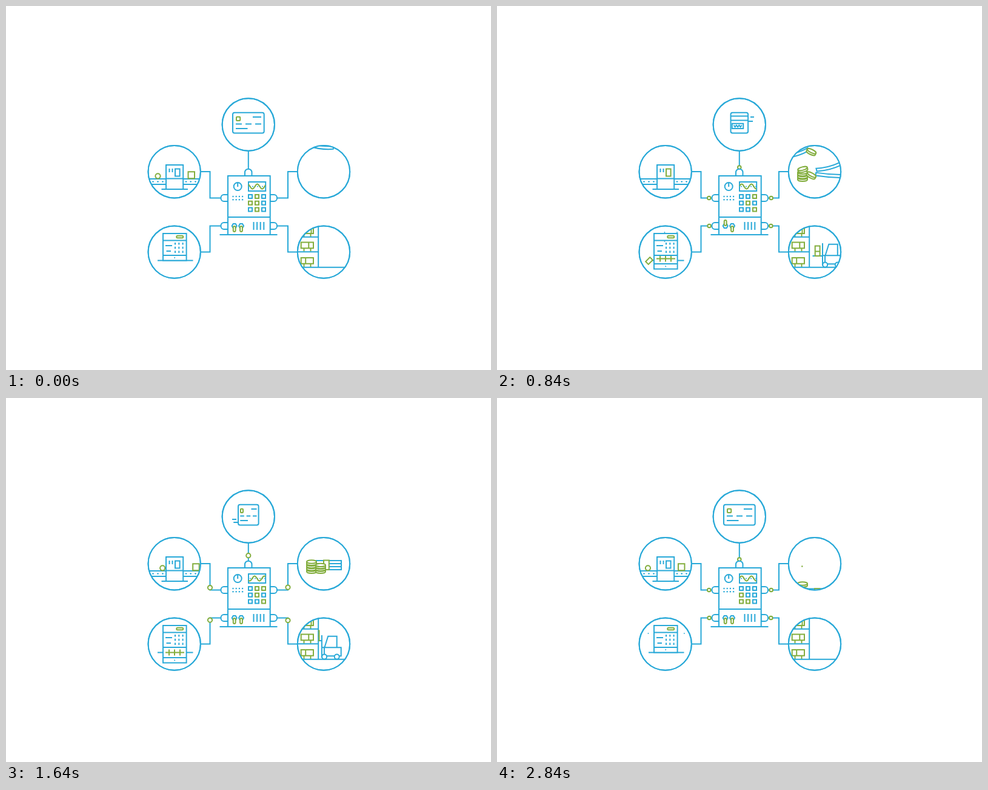
These frames come from a looping animation (800 by 600 pixels, 2880 ms). An HTML page with a canvas:

```html
<!DOCTYPE html>
<html lang="en">
<head>
<meta charset="utf-8">
<title>Connected systems</title>
<style>
html, body { margin: 0; width: 100%; height: 100%; overflow: hidden; background: #fff; }
canvas { display: block; }
</style>
</head>
<body>
<canvas id="stage" width="800" height="600"></canvas>
<script>
const ctx = document.getElementById('stage').getContext('2d');
const BLUE = '#29a9d8', GREEN = '#82ad3d', WHITE = '#fff';
const LOOP = 2880, STEP = 40, RADIUS = 43.2, MID = 399.8;

const clamp = v => Math.max(0, Math.min(1, v));
const mix = (a, b, p) => a + (b - a) * p;
const ease = p => (1 - Math.cos(Math.PI * clamp(p))) / 2;
const span = (t, from, to) => clamp((t - from) / (to - from));
const within = (t, from, to) => t >= from && t < to;

// Piecewise interpolation through [time, value] points.
function track(t, points) {
  for (let i = 1; i < points.length; i++) {
    const [t0, a] = points[i - 1], [t1, b] = points[i];
    if (t <= t1) return mix(a, b, span(t, t0, t1));
  }
  return points[points.length - 1][1];
}

function paint(color, fill) {
  if (fill) { ctx.fillStyle = fill; ctx.fill(); }
  ctx.strokeStyle = color;
  ctx.stroke();
}
function line(color, ...xy) {
  ctx.beginPath();
  for (let i = 0; i < xy.length; i += 2) ctx.lineTo(xy[i], xy[i + 1]);
  paint(color);
}
function box(color, x1, y1, x2, y2, r = 0, fill) {
  ctx.beginPath();
  ctx.roundRect(x1, y1, x2 - x1, y2 - y1, r);
  paint(color, fill);
}
function ring(color, x, y, r, fill) {
  ctx.beginPath();
  ctx.arc(x, y, r, 0, 7);
  paint(color, fill);
}
function spot(color, x, y, r = 1.2) {
  ctx.fillStyle = color;
  ctx.beginPath();
  ctx.arc(x, y, r, 0, 7);
  ctx.fill();
}
function clipped(x, y, w, h, draw) {
  ctx.save();
  ctx.beginPath();
  ctx.rect(x, y, w, h);
  ctx.clip();
  draw();
  ctx.restore();
}
function bubble(x, y, t, draw) {
  ring(BLUE, x, y, RADIUS, WHITE);
  ctx.save();
  ctx.beginPath();
  ctx.arc(x, y, RADIUS, 0, 7);
  ctx.clip();
  draw(t);
  ctx.restore();
  ring(BLUE, x, y, RADIUS);
}

// Control panel: key masks run left to right, top to bottom.
const PANEL = [
  { until: 280, keys: '010110010', up: [0, 0] },
  { until: 700, keys: '011010011', up: [1, 1] },
  { until: 1100, keys: '001010001', up: [1, 0] },
  { until: 1680, keys: '011010001', up: [0, 0] },
  { until: 2240, keys: '100011011', up: [0, 1] },
  { until: 2660, keys: '011011110', up: [1, 0] },
  { until: LOOP, keys: '000100110', up: [0, 0] }
];

const WIRES = [
  [321, 273, 336.5, 273, 336.5, 316.5, 356, 316.5],
  [321, 405.6, 336.5, 405.6, 336.5, 362.5, 356, 362.5],
  [481, 273, 465, 273, 465, 316.5, 446, 316.5],
  [481, 405.6, 465, 405.6, 465, 362.5, 446, 362.5]
];

function pointAlong(path, distance) {
  for (let i = 2; i < path.length; i += 2) {
    const [x0, y0, x1, y1] = path.slice(i - 2, i + 2);
    const length = Math.hypot(x1 - x0, y1 - y0);
    if (distance <= length || i === path.length - 2) {
      return [mix(x0, x1, distance / length), mix(y0, y1, distance / length)];
    }
    distance -= length;
  }
}

function drawWires(t) {
  line(BLUE, MID, 238, MID, 270);
  WIRES.forEach(path => line(BLUE, ...path));
  const travel = 0.086 * (t % 1000);
  const r = 3.6 * Math.min(1, travel / 5, (80 - travel) / 10);
  if (r < 0.3) return;
  ring(GREEN, MID, 239 + 0.375 * travel, r, WHITE);
  WIRES.forEach(path => ring(GREEN, ...pointAlong(path, travel), r, WHITE));
}

function drawMachine(t) {
  for (const y of [316.5, 362.5]) {
    box(BLUE, 354.5, y - 5.5, 366, y + 5.5, [5, 0, 0, 5], WHITE);
    box(BLUE, 435.5, y - 5.5, 447, y + 5.5, [0, 5, 5, 0], WHITE);
  }
  box(BLUE, 394, 268.7, 405.5, 280, [5.5, 5.5, 0, 0], WHITE);
  box(BLUE, 366, 280, 435.7, 377, 0, WHITE);
  line(BLUE, 366, 348, 435.7, 348);
  line(BLUE, 352.5, 377, 447.5, 377);
  ring(BLUE, 382.2, 297.5, 6.5);
  line(BLUE, 382.2, 291, 382.2, 298);
  for (const y of [314, 319.3])
    for (let i = 0; i < 4; i++) spot(BLUE, 374.5 + i * 5.2, y);

  box(BLUE, 400, 290, 428.2, 305);
  clipped(400, 290, 28.2, 15, () => {
    for (let x = 403; x < 428; x += 4) spot(BLUE, x, 297.5, 1);
    ctx.beginPath();
    const shift = 16 * (t / 500 % 1);
    for (let x = 400; x <= 428; x += 0.5)
      ctx.lineTo(x, 297.5 - 4 * Math.cos((x - 414.5 + shift) * Math.PI / 8));
    paint(GREEN);
  });

  const { keys, up } = PANEL.find(state => t < state.until);
  [...keys].forEach((on, i) => {
    const x = 403 + i % 3 * 11, y = 314 + Math.floor(i / 3) * 10.7;
    box(on === '1' ? GREEN : BLUE, x - 3, y - 3, x + 3, y + 3);
  });

  up.forEach((isUp, i) => {
    const x = 376.7 + i * 11.3, y = 362.5;
    ctx.beginPath();
    for (let k = 0; k < 6; k++)
      ctx.lineTo(x + 4 * Math.cos(k * Math.PI / 3), y + 4 * Math.sin(k * Math.PI / 3));
    ctx.closePath();
    paint(BLUE, WHITE);
    box(GREEN, x - 1.9, isUp ? 353 : 363, x + 1.9, isUp ? 362 : 372, 1.9, WHITE);
  });
  for (let i = 0; i < 4; i++) line(BLUE, 408.5 + i * 5.6, 356, 408.5 + i * 5.6, 369);
}

function drawCard(t) {
  const there = ease(span(t, 380, 1120)), back = ease(span(t, 1160, 1900));
  const turn = Math.cos(Math.PI * (there - back));
  const width = Math.abs(turn), at = x => MID + (x - MID) * width;

  clipped(373, 172, 54, 42, () => {
    if (there > 0 && there < 1) {
      line(BLUE, 361 + 83 * there, 183, 367 + 83 * there, 183);
      line(BLUE, 363 + 70 * there, 190, 374 + 70 * there, 190);
    }
    if (back > 0 && back < 1) {
      line(BLUE, 438 - 80 * back, 200, 430 - 80 * back, 200);
      line(BLUE, 437 - 70 * back, 205, 426 - 70 * back, 205);
    }
  });

  box(BLUE, at(374), 175.8, at(425.7), 209.5, Math.min(3, 25 * width), WHITE);
  const row = (x1, x2, y) => line(BLUE, at(x1), y, at(x2), y);
  if (turn >= 0) {
    box(GREEN, at(380), 182.7, at(386.2), 189, 1);
    row(407, 421, 183);
    for (const x of [379, 395, 411]) row(x, x + 10, 194.6);
    row(379, 398.5, 202);
  } else {
    row(374, 425.7, 181.5);
    row(374, 425.7, 188.5);
    box(BLUE, at(378), 193.7, at(411.5), 202);
    ctx.beginPath();
    for (let i = 0; i < 7; i++) ctx.lineTo(at(383 + i * 4), i % 2 ? 199.3 : 196.5);
    paint(BLUE);
  }
}

function drawConveyor(t) {
  const phase = t % 1440;
  line(BLUE, 230, 285, 325, 285);
  line(BLUE, 230, 294, 325, 294);
  for (const x of [242.5, 250.5, 258.5, 297, 304.7, 312.5]) spot(BLUE, x, 289.5, 1.3);
  for (const lap of [0, 1440]) {
    const shift = 0.0385 * (phase - lap);
    ring(GREEN, 250.5 + shift, 280.3, 4.1, WHITE);
    if (shift > -24) box(GREEN, 300.5 + shift, 273.3, 311 + shift, 284.3, 0, WHITE);
  }
  box(BLUE, 264, 262, 292.2, 302, 0, WHITE);
  line(BLUE, 264, 284.5, 292.2, 284.5);
  line(BLUE, 256.5, 302, 300, 302);
  line(BLUE, 269.5, 268, 269.5, 274);
  line(BLUE, 274.5, 268, 274.5, 274);
  box(within(phase, 440, 970) ? GREEN : BLUE, 279, 268.6, 286.6, 280.6);
}

function drawRegister(t) {
  const bottom = track(t, [[600, 419.5], [840, 433.5], [960, 436.6], [2240, 436.6], [2480, 421], [2560, 419.5]]);
  const front = bottom - 8.6;
  line(BLUE, 250, 419.5, 308.5, 419.5);

  if (within(t, 640, 1040)) {
    const p = (t - 640) / 200;
    ctx.save();
    ctx.translate(mix(266, 251, p), mix(395, 420, p));
    ctx.rotate(-Math.PI / 4 * p);
    box(GREEN, -5, -3.2, 5, 3.2, 0, WHITE);
    ctx.restore();
  }

  box(BLUE, 259, 375, 297.6, bottom, 0, WHITE);
  line(BLUE, 259, 386.5, 297.6, 386.5);
  line(BLUE, 259, 411, 297.6, 411);
  line(BLUE, 259, front, 297.6, front);
  spot(BLUE, 278.2, bottom - 4.4, 1);
  clipped(259, 412, 39, Math.max(0, front - 413), () => {
    const y = bottom - 17;
    line(GREEN, 263, y, 294, y);
    for (const x of [269, 278, 287]) line(GREEN, x, y - 5, x, y + 5);
  });

  if (within(t, 440, 760)) {
    box(GREEN, 265.3, 376, 271.5, 386.5);
    line(GREEN, 280, 377, 284, 379.5, 289, 379.5, 293.5, 377);
    line(GREEN, 280, 385.5, 284, 383, 289, 383, 293.5, 385.5);
  } else {
    box(GREEN, 281.3, 378.7, 292.2, 382.2, 1.5);
  }
  line(BLUE, 263, 395, 274, 395);
  line(BLUE, 264.5, 404, 272, 404);
  for (const x of [279, 285.3, 291.6])
    for (const y of [390, 396.8, 403.6]) line(BLUE, x, y, x, y + 3.4);

  if (within(t, 800, 880))
    for (const [x, y] of [[276.5, 373], [297, 373], [276.5, 388]]) spot(BLUE, x, y, 0.9);

  if (t >= 2440) {
    const p = span(t, 2480, 2840), length = 6 * (1 - p);
    const x = mix(14.7, 29.7, p), y = mix(408, 388, p);
    for (const side of [-1, 1]) {
      const cx = 279.2 + side * x;
      if (length > 1) line(BLUE, cx, y, cx + side * length * 0.6, y - length * 0.8);
      else spot(BLUE, cx, y, 0.9);
    }
  }
}

// Coins: landing and release times, landing tilt. Bills: the same plus sway and speed.
const COINS = [
  { x: 504, y: 283, lands: 570, leaves: 1950, tilt: -0.15 },
  { x: 504, y: 278.6, lands: 598, leaves: 2100, tilt: 0 },
  { x: 504, y: 274.3, lands: 730, leaves: 2180, tilt: 0.45 },
  { x: 504, y: 270, lands: 850, leaves: 2300, tilt: -0.25 },
  { x: 519, y: 283, lands: 865, leaves: 1970, tilt: 0.5 },
  { x: 519, y: 279.2, lands: 1040, leaves: 2105, tilt: 0.45 },
  { x: 519, y: 275.4, lands: 1180, leaves: 2190, tilt: -0.3 }
];
const BILLS = [
  { y: 280.5, lands: 870, sway: 34, speed: 0.057, tilt: 0.12 },
  { y: 275.5, lands: 920, sway: 16, speed: 0.13, tilt: -0.25 },
  { y: 270.5, lands: 1150, sway: 42, speed: 0.09, tilt: -0.3 }
];
const drop = (t, from) => (0.0111 * Math.max(0, t - from)) ** 2;

function drawCoin({ x, y, lands, leaves, tilt }, t) {
  const wait = Math.max(0, lands - t);
  ctx.save();
  ctx.translate(x, y - 0.2 * wait + drop(t, Math.max(leaves, 2000)) * (leaves < 2000 ? 1.4 : 1));
  ctx.rotate(wait ? tilt : 0);
  ctx.beginPath();
  ctx.ellipse(0, 0, 8, 2.7, 0, Math.PI, 0);
  ctx.lineTo(8, 3.2);
  ctx.ellipse(0, 3.2, 8, 2.7, 0, 0, Math.PI);
  ctx.closePath();
  paint(GREEN, WHITE);
  ctx.beginPath();
  ctx.ellipse(0, 0, 8, 2.7, 0, 0, Math.PI);
  paint(GREEN);
  ctx.restore();
}

function drawMoney(t) {
  const fall = drop(t, 2225);
  for (const bill of BILLS) {
    const wait = Math.max(0, bill.lands - t), sway = bill.sway * Math.sin(wait * 0.014);
    ctx.save();
    ctx.translate(532.5 + sway, bill.y - bill.speed * wait + fall);
    ctx.rotate(wait ? bill.tilt * Math.sin(Math.min(1.57, wait / 40)) : 0);
    const bend = Math.min(4, wait / 20);
    ctx.beginPath();
    ctx.moveTo(-20.5, -2.5);
    ctx.quadraticCurveTo(0, -2.5 + bend, 20.5, -2.5);
    ctx.lineTo(20.5, 2.5);
    ctx.quadraticCurveTo(0, 2.5 + bend, -20.5, 2.5);
    ctx.closePath();
    paint(BLUE, WHITE);
    ctx.restore();
  }
  if (t >= 1280) {
    const slide = ease(span(t, 1360, 1600)), rise = span(t, 1240, 1360);
    box(GREEN, 524, mix(268 - 6.5 * rise, 267.6, slide) + fall, 532.8, mix(268, 283, slide) + fall, 0, WHITE);
  }
  COINS.forEach(coin => drawCoin(coin, t));
  if (t >= 2800) spot(GREEN, 503.3, 277.5, 1.2);
}

function drawCrate(x1, y1, x2, divider) {
  box(GREEN, x1, y1, x2, y1 + 9.8);
  line(GREEN, divider, y1, divider, y1 + 9.8);
  for (const x of [491.5, 502.5]) line(GREEN, x, y1 + 10, x, y1 + 15);
}

function drawWarehouse(t) {
  const mast = track(t, [[0, 588], [560, 546], [840, 537], [1360, 527.5], [1700, 519.5], [2100, 519.5], [2480, 553.5], [2700, 590]]);
  const fork = track(t, [[560, 421.5], [840, 412], [1360, 400], [1700, 400], [2000, 405], [2400, 420]]);
  drawCrate(486.7, 415, 507, 494.2);
  drawCrate(486.7, 389.5, 507, 499.3);
  drawCrate(480, 365.3, 507, 503.5);
  line(BLUE, 480, 405.2, 515.2, 405.2);
  line(BLUE, 480, 380.7, 515.2, 380.7);
  line(BLUE, 515.2, 360, 515.2, 430.7);
  line(BLUE, 480, 430.7, 568, 430.7);

  clipped(515, 360, 60, 80, () => {
    line(BLUE, mast - 16.5, fork, mast, fork);
    if (t < 1900) {
      box(GREEN, mast - 12.3, fork - 16.5, mast - 4.4, fork);
      line(GREEN, mast - 12.3, fork - 7.5, mast - 4.4, fork - 7.5);
    }
    line(BLUE, mast, 391, mast, 428);
    line(BLUE, mast, 411.3, mast + 4, 411.3);
    line(BLUE, mast + 4.5, 411.3, mast + 10.3, 392.7, mast + 24.8, 392.7, mast + 24.8, 411.3);
    box(BLUE, mast + 4, 411.3, mast + 31.8, 425.3);
    for (const x of [4.2, 24.8]) ring(BLUE, mast + x, 426.6, 4, WHITE);
  });
}

function render(now) {
  const t = Math.floor(now % LOOP / STEP) * STEP;
  ctx.fillStyle = WHITE;
  ctx.fillRect(0, 0, 800, 600);
  ctx.lineWidth = 2;
  drawWires(t);
  drawMachine(t);
  bubble(MID, 195.5, t, drawCard);
  bubble(277.7, 273.2, t, drawConveyor);
  bubble(524, 273.2, t, drawMoney);
  bubble(277.7, 405.6, t, drawRegister);
  bubble(524, 405.6, t, drawWarehouse);
}

const start = performance.now();
function tick() {
  render(performance.now() - start);
  requestAnimationFrame(tick);
}
tick();
</script>
</body>
</html>
```
